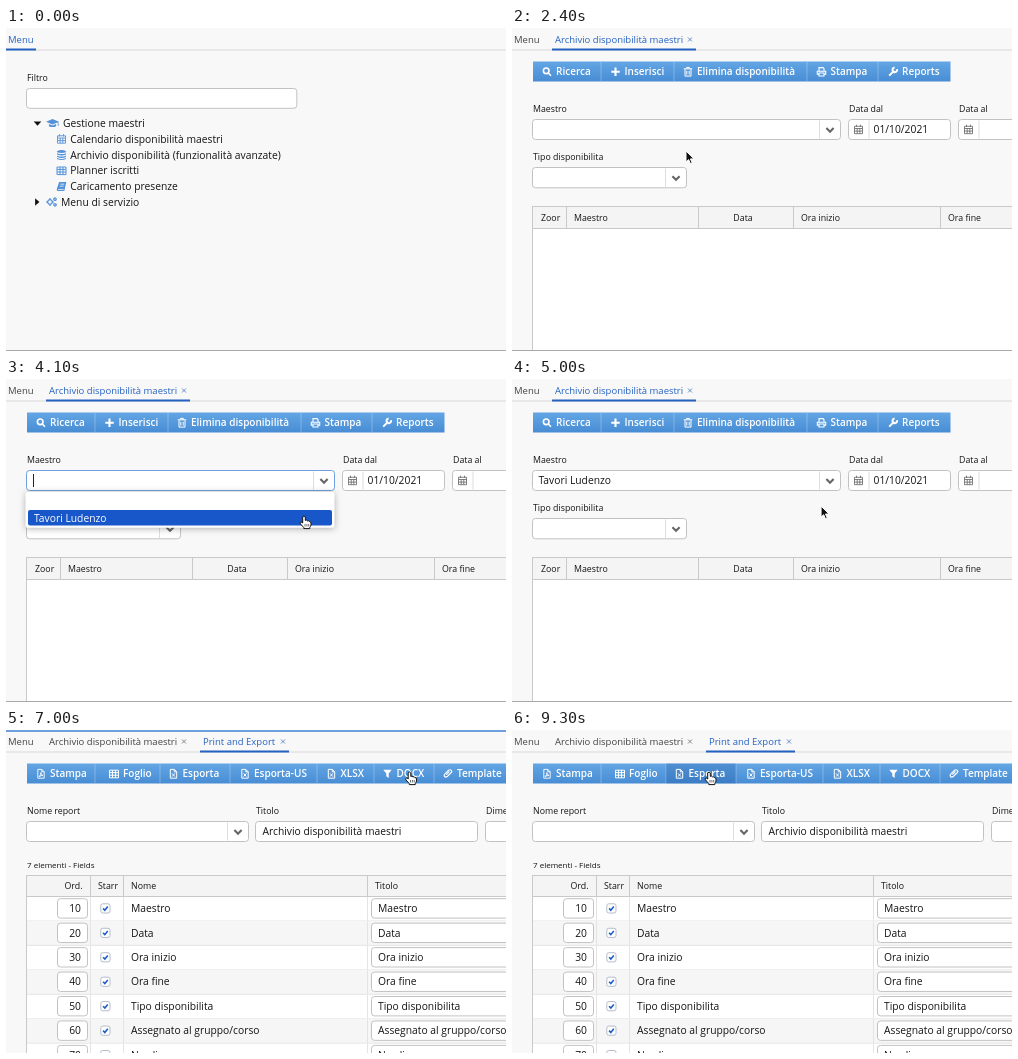
Recreate the animation shown at these times as an HTML page with a canvas. Size 500 by 323 pixels, loop 9500 ms.

```html
<!DOCTYPE html>
<html lang="it">
<head>
<meta charset="utf-8">
<title>Archivio disponibilità</title>
<style>
html, body { margin: 0; width: 100%; height: 100%; overflow: hidden; background: #f8f8f8; }
canvas { display: block; width: 500px; height: 323px; }
</style>
</head>
<body>
<canvas id="stage"></canvas>
<script>
const W = 500, H = 323, LOOP = 9500, STEP = 100;
const canvas = document.getElementById('stage');
const ctx = canvas.getContext('2d');
const dpr = window.devicePixelRatio || 1;
canvas.width = W * dpr;
canvas.height = H * dpr;

const FONT = '"Open Sans", "Noto Sans", sans-serif';
const BLUE = '#2462c2', ICON = '#5392da', INK = '#141414', LINE = '#c9c9c9', SELECT = '#1857c9';
const PERSON = 'Tavori Ludenzo';

// Each icon: path around its centre, line width (0 = filled)
const ICONS = {
  cap: ['M-6.5-1.2 0-4 6.5-1.2 0 1.6ZM-3.6 1V3.2Q0 5 3.6 3.2V1L0 2.6ZM5.2-.8H6V3H5.2Z', 0],
  cal: ['M-4-3.2H4V4.2H-4ZM-4-1H4M-4 1.6H4M-1.3-1V4M1.3-1V4M-2-4.8V-2.6M2-4.8V-2.6', .9],
  db: ['M-4.5-3.6Q0-6.2 4.5-3.6V-2.6Q0-1-4.5-2.6ZM-4.5-1.6Q0 .2 4.5-1.6V-.2Q0 1.5-4.5-.2ZM-4.5.9Q0 2.7 4.5.9V2.2Q0 4-4.5 2.2ZM-4.5 3.3Q0 5 4.5 3.3V4.2Q0 6-4.5 4.2Z', 0],
  grid: ['M-4.5-3.6H4.5V4H-4.5ZM-4.5-1.2H4.5M-4.5 1.4H4.5M-1.5-3.6V4M1.5-3.6V4', 1],
  book: ['M-2.4-4.5H4.8L2.8 4.5H-4Q-5.2 4-4.6 2.4ZM-1-2.7-1.2-1.8H2.6L2.8-2.7ZM-1.6-.7-1.8.2H2L2.2-.7ZM-3.4 2.6V3.4H2.2V2.6Z', 0],
  cogs: ['M.8 0A2.3 2.3 0 1 1-3.8 0 2.3 2.3 0 1 1 .8 0ZM4.7-2.8A1.2 1.2 0 1 1 2.3-2.8 1.2 1.2 0 1 1 4.7-2.8ZM4.7 2.8A1.2 1.2 0 1 1 2.3 2.8 1.2 1.2 0 1 1 4.7 2.8ZM-1.5-4V-2.5M-1.5 2.5V4M-5.2 0H-3.8M.8 0H2.2', 1.3],
  search: ['M2-1A2.8 2.8 0 1 1-3.6-1 2.8 2.8 0 1 1 2-1ZM1.3 1.2 4 4', 1.6],
  plus: ['M-4.2 0H4.2M0-4.2V4.2', 2.1],
  trash: ['M-3-2.6V4.3H3V-2.6M-4.2-3H4.2M-1.3-3V-4.4H1.3V-3M-1.2-1V2.8M1.2-1V2.8', 1],
  print: ['M-2.5-.6V-4.2H1.6L2.5-3.2V-.6M-2.5 2.4H-4.2V-.6H4.2V2.4H2.5M-2.5 1.2H2.5V4.2H-2.5Z', 1.1],
  wrench: ['M-3.8 3.8 1.2-1.2M4-2.6A2.3 2.3 0 1 1 1.6-4.2', 2],
  file: ['M-3.2-4.4H.8L3.2-2V4.4H-3.2ZM.8-4.4V-2H3.2M-1.4-.4 1.4 2.8M1.4-.4-1.4 2.8', 1],
  pdf: ['M-3.2-4.4H.8L3.2-2V4.4H-3.2ZM.8-4.4V-2H3.2M-1.8 3Q0 .6-.2-1.2Q.2 1.2 2 1.8Q0 1.2-1.8 3', .9],
  funnel: ['M-4.2-4H4.2L1.2-.4V4.2L-1.2 2.4V-.4Z', 0],
  clip: ['M2.8-.8-.8 2.8Q-2.6 4-3.6 2.6Q-4.4 1.4-3 0L.6-3.6Q2.2-4.6 3.4-3.4Q4.4-2.2 3-.8M1.4-2.4-1.6.8', 1.2],
  chevron: ['M-3.6-1.7 0 1.9 3.6-1.7', 2.1],
  close: ['M-2-2 2 2M2-2-2 2', .9],
  check: ['M-2.3 0-.6 1.8 2.4-1.8', 1.6],
  down: ['M-3.8-2H3.8L0 2.2Z', 0],
  right: ['M-1.9-3.8V3.8L2.4 0Z', 0]
};
for (const k in ICONS) ICONS[k][0] = new Path2D(ICONS[k][0]);

const HAND = new Path2D('M-1.3 7V.9Q0-.9 1.3.9V4.4Q2.6 3.6 3.4 4.9Q4.8 4.3 5.4 5.6Q7 5.4 7 7V9Q6.6 10.4 5.8 11.4V12.6H-.2V11.6L-3.6 7.8Q-4.4 6.4-3 6Q-2.2 6-1.3 7Z');
const ARROW = new Path2D('M0 0V11L2.6 8.6 4.4 12.6 6.2 11.8 4.4 7.9H8Z');

const clamp = v => Math.min(1, Math.max(0, v));

function text(s, x, y, size = 10.3, color = INK, weight = 400, align = 'left') {
  ctx.font = `${weight} ${size}px ${FONT}`;
  ctx.fillStyle = color;
  ctx.textAlign = align;
  ctx.fillText(s, x, y + size * .36);
}

const label = (s, x, y) => text(s, x, y, 8.8);

function icon(name, x, y, color) {
  const [path, width] = ICONS[name];
  ctx.save();
  ctx.translate(x, y);
  ctx.fillStyle = ctx.strokeStyle = color;
  ctx.lineWidth = width;
  if (width) ctx.stroke(path); else ctx.fill(path, 'evenodd');
  ctx.restore();
}

function fill(x, y, w, h, color) {
  ctx.fillStyle = color;
  ctx.fillRect(x, y, w, h);
}

function box(x1, y1, x2, y2, r, color, border) {
  ctx.beginPath();
  ctx.roundRect(x1, y1, x2 - x1, y2 - y1, r);
  ctx.fillStyle = color;
  ctx.fill();
  if (border) {
    ctx.strokeStyle = border;
    ctx.lineWidth = 1;
    ctx.stroke();
  }
}

const field = (x1, y1, x2, y2, border = '#c2c2c2') => box(x1, y1, x2, y2, 3, '#fff', border);

function select(x1, y1, x2, y2, arrow = '#666', border) {
  field(x1, y1, x2, y2, border);
  fill(x2 - 21.5, y1 + 1, 1, y2 - y1 - 2, '#ddd');
  icon('chevron', x2 - 10.5, (y1 + y2) / 2 + .3, arrow);
}

function dateField(x1, x2, value) {
  field(x1, 91.5, x2, 111.5);
  fill(x1 + 20, 92.5, 1, 18, '#ddd');
  icon('cal', x1 + 10, 101.5, '#707070');
  text(value, x1 + 25, 101.2);
}

// Tabs: [label, x, underline start, underline end]
const TABS = [['Menu', 2, 0, 30], ['Archivio disponibilità maestri', 43, 40, 184], ['Print and Export', 197, 194, 283]];

function tabs(active) {
  fill(0, 0, W, H, '#f8f8f8');
  fill(0, 21.5, W, 1, '#dadada');
  TABS.slice(0, active + 1).forEach(([name, x, from, to], i) => {
    const on = i === active;
    text(name, x, 11.3, 9.5, on ? BLUE : '#444');
    if (i) icon('close', to - 6, 11.5, on ? '#5580c4' : '#777');
    if (on) fill(from, 20.5, to - from, 2, BLUE);
  });
}

// Items: [icon, label, icon x, right edge]
function toolbar(items, hover) {
  const end = items[items.length - 1][3];
  const g = ctx.createLinearGradient(0, 34, 0, 54);
  g.addColorStop(0, '#63a5e4');
  g.addColorStop(1, '#478cd4');
  fill(21, 33.5, end - 21, 20, g);
  let left = 21;
  for (const [name, caption, x, right] of items) {
    if (caption === hover) fill(left, 33.5, right - left, 20, 'rgba(20,75,150,.25)');
    icon(name, x, 43.8, '#fff');
    text(caption, x + 9, 43.6, 10, '#fff', 600);
    if (right < end) fill(right - .5, 34, 1, 19, 'rgba(255,255,255,.28)');
    left = right;
  }
}

function tableHead(y, bottom, lines) {
  fill(20, y, W, H - y, '#fff');
  fill(20, y, W, bottom - y, '#f4f4f4');
  fill(20, y, W, 1, LINE);
  fill(20, bottom, W, 1, LINE);
  fill(20, y, 1, H - y, LINE);
  for (const x of lines) fill(x, y, 1, bottom - y, LINE);
}

const TREE = [
  ['cal', 'Calendario disponibilità maestri'],
  ['db', 'Archivio disponibilità (funzionalità avanzate)'],
  ['grid', 'Planner iscritti'],
  ['book', 'Caricamento presenze']
];

function menuPage(t) {
  tabs(0);
  label('Filtro', 21, 50);
  field(20.5, 60.5, 290.8, 80.3);
  icon('down', 31.5, 95.5, '#111');
  icon('cap', 46.5, 95, ICON);
  text('Gestione maestri', 57, 95);
  TREE.forEach(([name, caption], i) => {
    const y = 111 + i * 15.8;
    const on = i === 1 && t >= 2000;
    if (on) box(20.5, 119, 290.3, 134.6, 2.5, SELECT);
    icon(name, 55.5, y, on ? '#7fb2ee' : ICON);
    text(caption, 64.3, y, 10.3, on ? '#fff' : INK);
  });
  icon('right', 31, 174, '#111');
  icon('cogs', 45.5, 174, ICON);
  text('Menu di servizio', 55, 174);
  fill(0, 322, W, 1, '#a8a8a8');
}

const ARCHIVE_BAR = [
  ['search', 'Ricerca', 35, 89], ['plus', 'Inserisci', 103.5, 162], ['trash', 'Elimina disponibilità', 176, 295],
  ['print', 'Stampa', 309.5, 366], ['wrench', 'Reports', 381, 438.5]
];

function archivePage(t) {
  const open = t >= 3700 && t < 4500;
  tabs(1);
  toolbar(ARCHIVE_BAR);
  label('Maestro', 21, 81);
  label('Data dal', 337, 81);
  label('Data al', 447, 81);
  select(20.5, 91.5, 328.5, 111.5, t >= 3300 && t < 3700 ? '#000' : '#666', open ? '#6f9fe0' : undefined);
  if (t >= 4500) text(PERSON, 26.5, 101.2);
  dateField(336.5, 438.5, '01/10/2021');
  dateField(446.5, 520, '');
  label('Tipo disponibilita', 21, 129.3);
  select(20.5, 139.5, 174.5, 159.8);

  tableHead(178, 200, [54, 186, 281, 428]);
  label('Zoor', 29, 189.6);
  label('Maestro', 62, 189.6);
  text('Data', 231, 189.6, 8.8, INK, 400, 'center');
  label('Ora inizio', 289, 189.6);
  label('Ora fine', 436, 189.6);
  fill(0, 322, W, 1, '#a8a8a8');

  if (open) {
    fill(27, 95, 1, 13, '#222');
    ctx.save();
    ctx.shadowColor = 'rgba(0,0,0,.3)';
    ctx.shadowBlur = 6 * dpr;
    ctx.shadowOffsetY = dpr;
    box(19.5, 113, 328.5, 148.8, 2, '#fff');
    ctx.restore();
    const on = t >= 4000;
    if (on) box(22, 131, 326, 146.5, 2, SELECT);
    text(PERSON, 28, 138.8, 10.3, on ? '#fff' : INK);
  }
}

const EXPORT_BAR = [
  ['pdf', 'Stampa', 35, 89], ['grid', 'Foglio', 108, 154], ['file', 'Esporta', 167.5, 224],
  ['file', 'Esporta-US', 239, 311], ['file', 'XLSX', 325.5, 368], ['funnel', 'DOCX', 381.5, 428],
  ['clip', 'Template', 442, 520]
];
const ROWS = ['Maestro', 'Data', 'Ora inizio', 'Ora fine', 'Tipo disponibilita', 'Assegnato al gruppo/corso', 'Nordine'];
const COLUMNS = [84, 117, 361];

function exportPage(t) {
  tabs(2);
  toolbar(EXPORT_BAR, t >= 8300 ? 'Esporta' : '');
  label('Nome report', 21, 81);
  label('Titolo', 250, 81);
  label('Dimensione', 480, 81);
  select(20.5, 91.5, 242.5, 111.5);
  field(249.5, 91.5, 471.5, 111.5);
  text('Archivio disponibilità maestri', 256.5, 101.2);
  field(479.5, 91.5, 520, 111.5);
  text('7 elementi - Fields', 21, 135.3, 8);

  tableHead(145, 166, COLUMNS);
  text('Ord.', 76.5, 156, 8.8, INK, 400, 'right');
  label('Starr', 92, 156);
  label('Nome', 125, 156);
  label('Titolo', 369, 156);
  ROWS.forEach((name, i) => {
    const y = 178.4 + i * 24.45;
    if (i % 2) fill(21, y - 12, W, 24.4, '#f6f6f6');
    fill(21, y + 12, W, 1, '#e4e4e4');
    for (const x of COLUMNS) fill(x, y - 11.5, 1, 24, '#e4e4e4');
    field(51.5, y - 9.7, 81.5, y + 9.7);
    text((i + 1) * 10, 75, y, 10.3, INK, 400, 'right');
    box(94.8, y - 4.6, 104, y + 4.6, 2, '#fff', '#b4bccb');
    icon('check', 99.4, y, '#1b5cc8');
    text(name, 125, y);
    field(365.5, y - 9.7, 520, y + 9.7);
    text(name, 372, y);
  });
}

function loadingBar(t) {
  if (t >= 6000 && t < 7300) fill(0, 0, W * clamp((t - 5900) / 700), 2, '#6b9fdd');
}

// Pointer moves: [start, end, x, y]
const MOVES = [
  [1000, 1500, 174, 123], [2900, 3400, 319.5, 106], [3900, 4100, 298, 137],
  [4900, 5400, 404.5, 42], [6600, 6700, 403.5, 42], [7600, 8300, 197, 42]
];
const CLICKS = [1900, 3400, 4200, 5600, 8800], CLICK_TIME = 200;
const HANDS = [[1500, 2300], [3300, 4500], [6600, LOOP]];

function pointer(t) {
  if (t < 1000) return;
  let x = 231, y = 293;
  for (const [from, to, tx, ty] of MOVES) {
    const p = clamp((t - from) / (to - from));
    const e = p * p * (3 - 2 * p);
    x += (tx - x) * e;
    y += (ty - y) * e;
  }
  const click = CLICKS.find(c => t >= c && t < c + CLICK_TIME);
  if (click !== undefined) {
    ctx.beginPath();
    ctx.arc(x + .5, y, 21.5 * Math.sin(Math.PI * (t - click) / CLICK_TIME), 0, 7);
    ctx.fillStyle = 'rgba(255,255,255,.2)';
    ctx.fill();
    ctx.strokeStyle = '#222';
    ctx.lineWidth = 1.2;
    ctx.stroke();
  }
  const hand = HANDS.some(([a, b]) => t >= a && t < b);
  ctx.save();
  ctx.translate(x, y);
  ctx.lineJoin = 'round';
  ctx.lineWidth = 1;
  ctx.fillStyle = hand ? '#fff' : '#111';
  ctx.strokeStyle = hand ? '#111' : '#fff';
  ctx.fill(hand ? HAND : ARROW);
  ctx.stroke(hand ? HAND : ARROW);
  if (hand) {
    ctx.beginPath();
    for (const fx of [1, 2.9, 4.7]) {
      ctx.moveTo(fx, 8);
      ctx.lineTo(fx, 10.5);
    }
    ctx.lineWidth = .6;
    ctx.stroke();
  }
  ctx.restore();
}

function draw(now) {
  const t = Math.floor(Math.max(0, now - start) % LOOP / STEP) * STEP;
  ctx.setTransform(dpr, 0, 0, dpr, 0, 0);
  if (t < 2300) menuPage(t);
  else if (t < 6600) archivePage(t);
  else exportPage(t);
  loadingBar(t);
  pointer(t);
  requestAnimationFrame(draw);
}

const start = performance.now();
draw(start);
</script>
</body>
</html>
```
